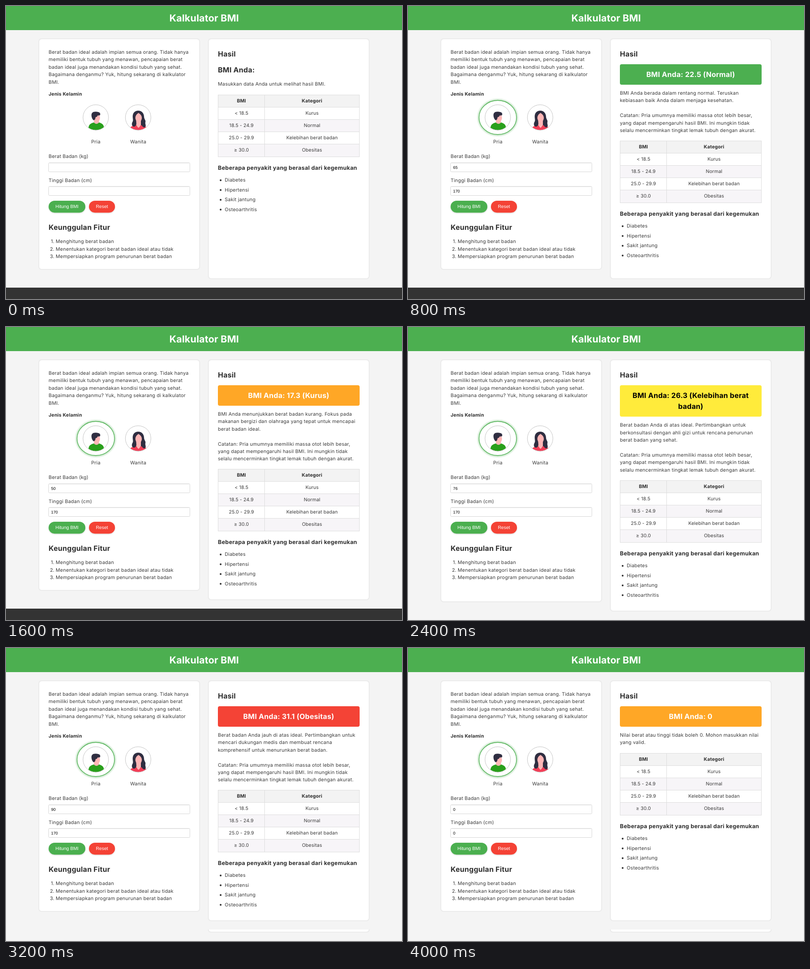
An HTML page for the animation above (4.8 s loop, 869 by 644 pixels).

```html
<!DOCTYPE html>
<html lang="id">
<head>
<meta charset="utf-8">
<title>Kalkulator BMI</title>
<style>
  html, body { margin: 0; width: 100%; height: 100%; overflow: hidden; background: #f4f4f4; }
  svg { display: block; width: 869px; height: 644px; }
  text { font: 10.6px Inter, "Open Sans", sans-serif; letter-spacing: .22px; fill: #3a3a3a; text-rendering: geometricPrecision; }
  .h1 { font-size: 21.2px; font-weight: 700; letter-spacing: .15px; fill: #fff; }
  .h2 { font-size: 15.7px; font-weight: 700; letter-spacing: .24px; fill: #2e2e2e; }
  .h3 { font-size: 12.3px; font-weight: 700; letter-spacing: .31px; fill: #2e2e2e; }
  .b { font-size: 10.4px; font-weight: 700; letter-spacing: .2px; fill: #2e2e2e; }
  .cell { font-size: 10.4px; letter-spacing: .12px; }
  .btn { font: 10.24px "Liberation Sans", Arial, sans-serif; letter-spacing: 0; fill: #fff; }
  .field { font: 8.9px "Liberation Sans", Arial, sans-serif; letter-spacing: 0; fill: #000; }
  .mid { text-anchor: middle; }
  .end { text-anchor: end; }
</style>
</head>
<body>
<svg id="stage" viewBox="0 0 869 644" xmlns="http://www.w3.org/2000/svg">
  <defs>
    <filter id="drop" x="-20%" y="-30%" width="140%" height="180%">
      <feDropShadow dx="0" dy="1.3" stdDeviation="1.3" flood-color="#000" flood-opacity=".16"/>
    </filter>
    <filter id="blur" x="-20%" y="-20%" width="140%" height="140%"><feGaussianBlur stdDeviation="1.8"/></filter>
    <clipPath id="face1"><circle cx="197" cy="245" r="28"/></clipPath>
    <clipPath id="face2"><circle cx="290" cy="245" r="28"/></clipPath>
  </defs>
  <rect width="869" height="644" fill="#f4f4f4"/>
  <rect id="footer" y="619" width="869" height="25" fill="#333"/>
  <rect width="869" height="53" fill="#4caf50"/>
  <g id="strip">
    <path d="M443 618.5H798C798 623 795 625.5 791 625.5H450C446 625.5 443 623 443 618.5Z" fill="#ebebeb"/>
    <path d="M445 618.5H796C796 621.5 793.5 623.5 790 623.5H451C447.5 623.5 445 621.5 445 618.5Z" fill="#fff"/>
  </g>
  <g id="cards"></g>
  <g id="form"></g>

  <g id="ring">
    <ellipse cx="197" cy="245" rx="41.5" ry="38" fill="none" stroke="#4caf50" stroke-width="5" opacity=".34" filter="url(#blur)"/>
    <ellipse cx="197" cy="245" rx="41" ry="37.5" fill="#fff" stroke="#4caf50" stroke-width="1.3"/>
  </g>
  <g clip-path="url(#face1)">
    <circle cx="197" cy="245" r="28" fill="#fff"/>
    <path d="M193 248H204V260H193Z" fill="#ffb6b6"/>
    <path d="M181 269C181 261 185 258 193 256C196 260 201 260 204 256C212 258 215 262 215 268C210 272 203 273 197 273C191 273 185 272 181 269Z" fill="#2aa01c"/>
    <ellipse cx="199.5" cy="246" rx="6.8" ry="8.5" fill="#ffb6b6"/>
    <path d="M191 250C188 247 186 238 189 235C192 231 203 232 206 235C208 239 206 241 204 240.5C201 240 200 241 200 243.500C197 243 196 245 196 248C194 251 193 252 191 250Z" fill="#2f2e41"/>
  </g>
  <g clip-path="url(#face2)">
    <circle cx="290" cy="245" r="28" fill="#fff"/>
    <path d="M290 230C283 230 278 235 278 243C278 249 280 251 277 256C275 260 278 266 283 266C287 266 290 262 292 262C295 266 301 269 305 266C308 262 304 259 306 255C307 251 303 249 303 244C303 236 298 230 290 230Z" fill="#2f2e41"/>
    <path d="M272 268C275 264 280 262 285 261L290 267L297 262C303 263 307 265 309 267C303 272 296 273 290 273C283 273 277 271 272 268Z" fill="#f43f58"/>
    <path d="M286 248H296V262L291 268L285 261Z" fill="#ffb6b6"/>
    <path d="M284 244C285 240 287 237 291 235C295 238 298 241 298 246C298 251 295 255 291 255C287 255 283 250 284 244Z" fill="#ffb6b6"/>
    <path d="M284 243C283 250 287 254 286 260C285 265 280 267 277 263C275 259 280 254 280 248ZM298 244C299 251 295 255 297 260C299 266 304 269 306 265C308 261 304 258 306 254C306 250 303 249 303 244Z" fill="#2f2e41"/>
  </g>
  <g fill="none" stroke="#c4c4c4">
    <circle cx="197" cy="245" r="28"/><circle cx="290" cy="245" r="28"/>
  </g>

  <rect id="banner" x="465" y="128" width="311" rx="4"/>
  <g id="result"></g>
  <g id="table"></g>
</svg>
<script>
const LINE = 16.38, STEP = 800;
const $ = id => document.getElementById(id);

function add(parent, tag, attrs, text) {
  const el = document.createElementNS("http://www.w3.org/2000/svg", tag);
  for (const k in attrs) el.setAttribute(k, attrs[k]);
  if (text !== undefined) el.textContent = text;
  parent.appendChild(el);
  return el;
}
const label = (parent, x, y, text, cls = "") => add(parent, "text", { x, y, class: cls }, text);
const lines = (parent, x, y, list) => list.forEach((s, i) => label(parent, x, y + i * LINE, s));

function card(x) {
  const edge = add($("cards"), "rect", { x, y: 71, width: 355, rx: 7, fill: "#ebebeb" });
  const body = add($("cards"), "rect", { x: x + 2, y: 73, width: 351, rx: 5.5, fill: "#fff" });
  return bottom => {
    edge.setAttribute("height", bottom - 71);
    body.setAttribute("height", bottom - 75);
  };
}
const leftCard = card(71), rightCard = card(443);

function field(y) {
  add(form, "rect", { x: 93.5, y: y - .5, width: 310, height: 20, rx: 2, fill: "#fff", stroke: "#d6d6d6" });
  add(form, "path", { d: `M95 ${y + .5}H402.5`, stroke: "#efefef" });
  return label(form, 99, y + 13.2, "", "field");
}
function button(x, width, fill, text) {
  add(form, "rect", { x, y: 428, width, height: 26.2, rx: 13.1, fill, filter: "url(#drop)" });
  label(form, x + width / 2, 444.2, text, "btn mid");
}

const form = $("form");
label(form, 434.8, 33.8, "Kalkulator BMI", "h1 mid");
lines(form, 93.5, 105, [
  "Berat badan ideal adalah impian semua orang. Tidak hanya",
  "memiliki bentuk tubuh yang menawan, pencapaian berat",
  "badan ideal juga menandakan kondisi tubuh yang sehat.",
  "Bagaimana denganmu? Yuk, hitung sekarang di kalkulator",
  "BMI."
]);
label(form, 93.5, 196.7, "Jenis Kelamin", "b");
label(form, 197.2, 302.3, "Pria", "mid");
label(form, 290.2, 302.3, "Wanita", "mid");
label(form, 93.5, 334, "Berat Badan (kg)");
label(form, 93.5, 387, "Tinggi Badan (cm)");
const weight = field(345), height = field(397);
button(93.5, 80.7, "#4caf50", "Hitung BMI");
button(182, 57.2, "#f44336", "Reset");
label(form, 93.5, 492, "Keunggulan Fitur", "h2");
["Menghitung berat badan", "Menentukan kategori berat badan ideal atau tidak", "Mempersiapkan program penurunan berat badan"]
  .forEach((s, i) => {
    label(form, 106.4, 521.4 + i * 16.25, i + 1 + ".", "end");
    label(form, 109, 521.4 + i * 16.25, s);
  });
label(form, 465, 110.8, "Hasil", "h2");

// Table and list share one group that slides below the result text
const table = $("table");
[["BMI", "Kategori"], ["< 18.5", "Kurus"], ["18.5 - 24.9", "Normal"], ["25.0 - 29.9", "Kelebihan berat badan"], ["≥ 30.0", "Obesitas"]]
  .forEach(([a, b], i) => {
    const y = Math.round(i * 27.1), h = Math.round((i + 1) * 27.1) - y;
    const fill = i === 0 ? "#f3f3f3" : i % 2 ? "#fff" : "#f7f5f8";
    add(table, "rect", { x: 465.5, y: y + .5, width: 310, height: h, fill, stroke: "#ddd" });
    const cls = i ? "cell mid" : "b mid";
    label(table, 516.7, y + 17.4, a, cls);
    label(table, 671.6, y + 17.4, b, cls);
  });
add(table, "path", { d: "M567.5 .5V136", stroke: "#ddd" });
label(table, 465, 164.8, "Beberapa penyakit yang berasal dari kegemukan", "h3");
["Diabetes", "Hipertensi", "Sakit jantung", "Osteoarthritis"].forEach((s, i) => {
  const y = 191.4 + i * 21.5;
  add(table, "circle", { cx: 471, cy: y - 3.3, r: 2, fill: "#333" });
  label(table, 480, y, s);
});

const note = [
  "",
  "Catatan: Pria umumnya memiliki massa otot lebih besar,",
  "yang dapat mempengaruhi hasil BMI. Ini mungkin tidak",
  "selalu mencerminkan tingkat lemak tubuh dengan akurat."
];
const scenes = [
  { kg: "", cm: "", top: 195, footer: 1 },
  { kg: 65, cm: 170, top: 296, footer: 1, color: "#4caf50", title: ["BMI Anda: 22.5 (Normal)"], text: [
    "BMI Anda berada dalam rentang normal. Teruskan",
    "kebiasaan baik Anda dalam menjaga kesehatan.", ...note] },
  { kg: 50, cm: 170, top: 312, footer: 1, color: "#ffa726", title: ["BMI Anda: 17.3 (Kurus)"], text: [
    "BMI Anda menunjukkan berat badan kurang. Fokus pada",
    "makanan bergizi dan olahraga yang tepat untuk mencapai",
    "berat badan ideal.", ...note] },
  { kg: 76, cm: 170, top: 337, grow: 25, color: "#ffeb3b", ink: "#000",
    title: ["BMI Anda: 26.3 (Kelebihan berat", "badan)"], text: [
    "Berat badan Anda di atas ideal. Pertimbangkan untuk",
    "berkonsultasi dengan ahli gizi untuk rencana penurunan",
    "berat badan yang sehat.", ...note] },
  { kg: 90, cm: 170, top: 312, strip: 1, color: "#f44336", title: ["BMI Anda: 31.1 (Obesitas)"], text: [
    "Berat badan Anda jauh di atas ideal. Pertimbangkan untuk",
    "mencari dukungan medis dan membuat rencana",
    "komprehensif untuk menurunkan berat badan.", ...note] },
  { kg: 0, cm: 0, top: 231, strip: 1, color: "#ffa726", title: ["BMI Anda: 0"], text: [
    "Nilai berat atau tinggi tidak boleh 0. Mohon masukkan nilai",
    "yang valid."] }
];

const show = (id, on) => $(id).setAttribute("visibility", on ? "visible" : "hidden");

function render(s) {
  const grow = s.grow || 0, result = $("result"), banner = $("banner");
  weight.textContent = s.kg;
  height.textContent = s.cm;
  leftCard(580 + grow);
  rightCard(600.5 + grow);
  show("footer", s.footer);
  show("strip", s.strip);
  show("ring", s.color);
  show("banner", s.color);
  table.setAttribute("transform", `translate(0 ${s.top})`);
  result.textContent = "";
  if (!s.color) {
    label(result, 465, 146, "BMI Anda:", "h2");
    label(result, 465, 174.6, "Masukkan data Anda untuk melihat hasil BMI.");
    return;
  }
  const extra = (s.title.length - 1) * 24.4;
  banner.setAttribute("fill", s.color);
  banner.setAttribute("height", Math.round(45 + extra));
  s.title.forEach((t, i) => {
    label(result, 620.3, 156 + i * 24.4, t, "h2 mid").style.fill = s.ink || "#fff";
  });
  lines(result, 465, 195 + extra, s.text);
}

let current = -1;
function tick(now) {
  const i = Math.floor(Math.max(0, now) / STEP) % scenes.length;
  if (i !== current) render(scenes[current = i]);
  requestAnimationFrame(t => tick(t - start));
}
const start = performance.now();
tick(0);
</script>
</body>
</html>
```
